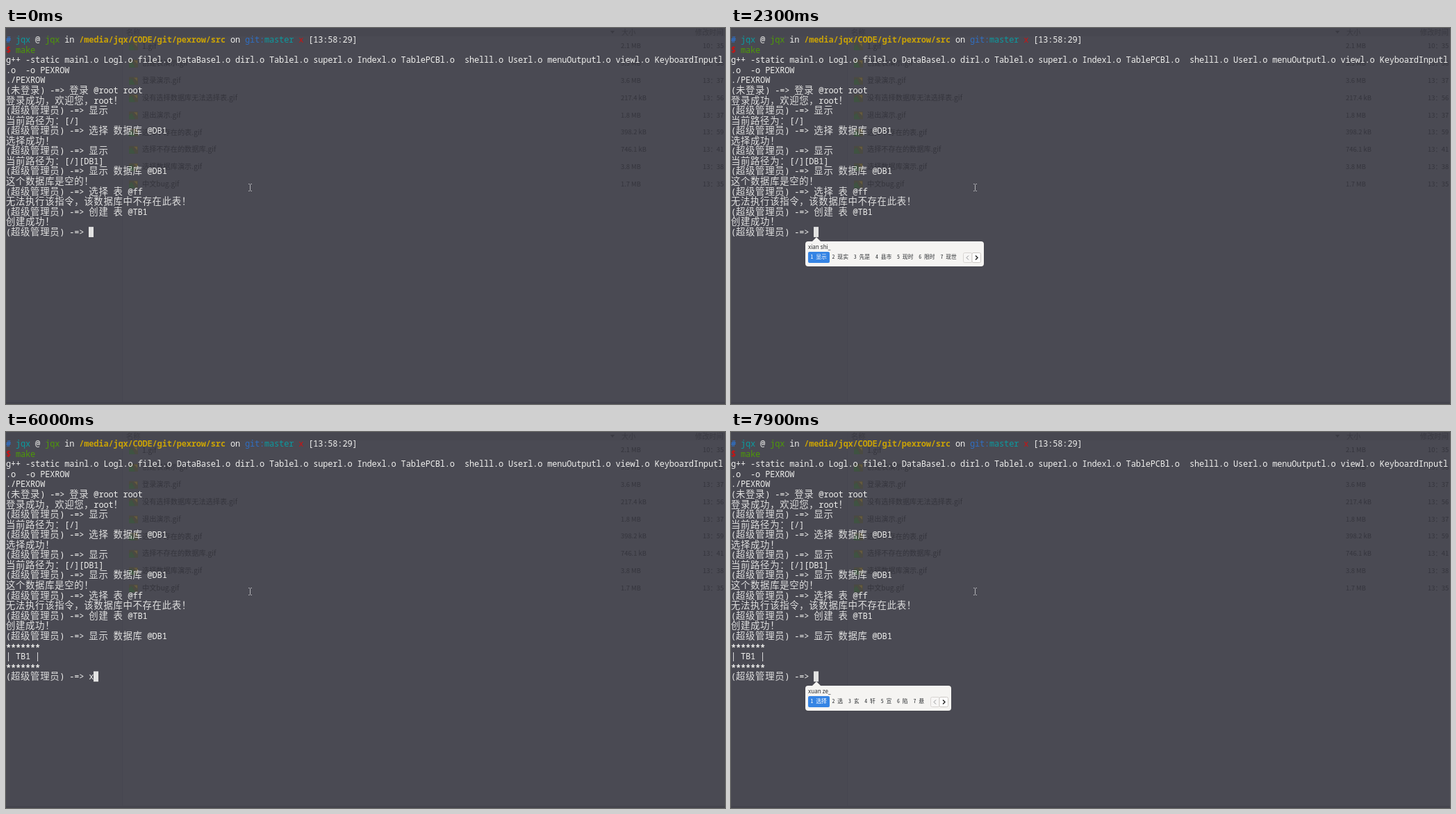
These frames come from a looping animation (1035 px wide and 541 px high, 8 s). An HTML page:

```html
<!DOCTYPE html>
<html lang="zh-CN">
<head>
<meta charset="utf-8">
<title>Terminal</title>
<style>
  html, body { margin: 0; width: 1035px; height: 541px; overflow: hidden; background: #4a4a53; }
  #stage { position: absolute; left: 0; top: 0; display: block; }
  text { white-space: pre; }
  #term { font: 12px "Noto Sans Mono", "DejaVu Sans Mono", monospace; fill: #f0f0ee; }
  #term .wide { font: 300 13.4px "Noto Sans CJK SC", "Noto Sans CJK", sans-serif; fill-opacity: .9; }
  #files { font: 10.2px "Noto Sans CJK SC", "Noto Sans CJK", sans-serif; fill: #35353d; }
  #files .num { font-size: 9.4px; }
  #files .head { fill: #3a3a42; }
  #popup {
    position: absolute; left: 107px; height: 36px; box-sizing: border-box; padding: 0 4px 0 3.5px;
    background: #f5f4f2; border-radius: 4px; box-shadow: 0 0 1px #2228;
    font-family: "Noto Sans Mono CJK SC", "Noto Sans CJK SC", "Noto Sans CJK", monospace;
    font-size: 7.8px; color: #2a2d30; white-space: pre;
  }
  #popup::before {
    content: ""; position: absolute; left: 10px; top: -6px;
    border: 6px solid transparent; border-top: 0; border-bottom-color: #f5f4f2;
  }
  #pinyin { position: absolute; left: 4px; top: 2px; font: 8px/12px "Noto Sans", sans-serif; }
  #row { display: flex; margin-top: 15px; height: 16px; line-height: 13px; }
  #row span { padding: 0 3.9px; border-radius: 2px; }
  #row span:first-child { background: #3584e4; color: #fff; }
  #row svg { flex: none; margin-left: 5px; fill: none; }
</style>
</head>
<body>
<svg id="stage" width="1035" height="541">
  <rect width="167" height="541" fill="#494952"/>
  <rect width="1035" height="12" fill="#474750"/>
  <rect x="167" width="1" height="541" fill="#464650"/>
  <rect y="538" width="1035" height="3" fill="#44444d"/>
  <g id="files"></g>
  <g id="term"></g>
  <path d="M349 224.5h1.5l1 1 1-1h1.5M351.5 225.5v8M349 234.5h1.5l1-1 1 1h1.5" fill="none" stroke="#b4b4b8"/>
</svg>
<div id="popup"><div id="pinyin"></div><div id="row"></div></div>
<script>
const CELL = 7.02, LINE = 14.56, TOP = 9.5, LOOP = 8000;
const $ = id => document.getElementById(id);
const rowTop = row => TOP + row * LINE;
const span = ch => ch > '\u2e80' ? 2 : 1;
const columns = s => [...s].reduce((n, ch) => n + span(ch), 0);

function add(parent, tag, attrs, content = '') {
  const el = document.createElementNS('http://www.w3.org/2000/svg', tag);
  for (const key in attrs) el.setAttribute(key, attrs[key]);
  el.textContent = content;
  return parent.appendChild(el);
}

// Puts every character on the terminal grid, in runs of narrow and wide ones.
function print(parent, row, s, col = 0, style = {}) {
  for (const run of s.match(/[\u2e80-\uffff]+|[^\u2e80-\uffff]+/g)) {
    const width = span(run[0]);
    const x = [...run].map((_, i) => ((col + i * width) * CELL).toFixed(2)).join(' ');
    add(parent, 'text', { x, y: rowTop(row) + 11.7, class: width > 1 ? 'wide' : '', ...style },
      run.replace(/ /g, '\u00a0'));
    col += columns(run);
  }
  return col;
}

// File manager showing through the terminal
const files = $('files');
const faint = (x, y, s, cls = '') => add(files, 'text', { x, y, class: cls }, s);
faint(173, 9.5, '名称', 'head');
faint(886, 9.5, '大小', 'head');
faint(992, 9.5, '修改时间', 'head');
add(files, 'path', { d: 'M870 4h6l-3 4z', class: 'head' });
[
  ['1', '2.1 MB', '10：35'],
  ['创建表演示', '5.3 MB', '13：58'],
  ['登录演示', '3.6 MB', '13：37'],
  ['没有选择数据库无法选择表', '217.4 kB', '13：56'],
  ['退出演示', '1.8 MB', '13：37'],
  ['选择不存在的表', '398.2 kB', '13：59'],
  ['选择不存在的数据库', '746.1 kB', '13：41'],
  ['选择数据库演示', '3.8 MB', '13：38'],
  ['中文bug', '1.7 MB', '13：35']
].forEach(([name, size, time], i) => {
  const y = 26 + i * 24.8;
  add(files, 'rect', { x: 177, y: y - 5, width: 13, height: 11, fill: '#4b4a42' });
  add(files, 'path', { d: `M177 ${y + 6}v-6l4-3 5 9z`, fill: '#3f5342' });
  add(files, 'path', { d: `M184 ${y - 4}h5v5z`, fill: '#665a3e' });
  faint(196, y + 3.6, name + '.gif');
  faint(885, y + 3.4, size, 'num');
  faint(1003, y + 3.4, time, 'num');
});

// Terminal history
const term = $('term');
const blue = '#2f6fc4', cyan = '#0a9ba0', green = '#4e9a06', red = '#d01010';
const styled = (row, parts) => parts.reduce((col, [s, fill = '#f0f0ee', weight = 400]) =>
  print(term, row, s, col, { fill, 'font-weight': weight }), 0);
styled(0, [
  ['# ', blue, 700], ['jqx ', cyan], ['@ '], ['jqx ', green], ['in '],
  ['/media/jqx/CODE/git/pexrow/src ', '#c9a206', 700], ['on '],
  ['git:', blue], ['master ', cyan], ['x ', red], ['[13:58:29]']
]);
styled(1, [['$ ', red, 700], ['make', green]]);

const prompt = '(超级管理员) -=> ', home = columns(prompt);
[
  'g++ -static mainl.o Logl.o filel.o DataBasel.o dirl.o Tablel.o superl.o Indexl.o ' +
    'TablePCBl.o  shelll.o Userl.o menuOutputl.o viewl.o KeyboardInputl',
  '.o  -o PEXROW',
  './PEXROW',
  '(未登录) -=> 登录 @root root',
  '登录成功，欢迎您，root！',
  prompt + '显示',
  '当前路径为：[/]',
  prompt + '选择 数据库 @DB1',
  '选择成功！',
  prompt + '显示',
  '当前路径为：[/][DB1]',
  prompt + '显示 数据库 @DB1',
  '这个数据库是空的！',
  prompt + '选择 表 @ff',
  '无法执行该指令，该数据库中不存在此表！',
  prompt + '创建 表 @TB1',
  '创建成功！',
  prompt
].forEach((s, i) => print(term, i + 2, s));

// Printed once the command has run; the stars sit mid-cell
const output = add(term, 'g', {});
const stars = row => print(output, row, '*******', 0, { transform: 'translate(0 2.5)', 'font-weight': 600 });
print(output, 19, '显示 数据库 @DB1', home);
stars(20);
print(output, 21, '| TB1 |');
stars(22);
print(output, 23, prompt);

const input = add(term, 'g', {});
const caret = add(term, 'rect', { width: 7, height: 14.8, fill: '#e2e2e2' });

// [time, typed text, pinyin, candidates]
const RUN = 4700;
const steps = [[0, '']];
const type = (start, s) => [...s].forEach((_, i) => steps.push([start + i * 100, s.slice(0, i + 1)]));
const erase = (start, s) => [...s].forEach((_, i) => steps.push([start + i * 100, s.slice(0, -1 - i)]));
const compose = (time, pinyin, words) => steps.push([time, '', pinyin, words]);

type(200, 'xians');
steps.push([800, 'xian']);
erase(1000, 'xian');
compose(1800, 'x', '下 想 小 向 学 新 些');
compose(1900, 'xi', '系 西 喜 洗 细 吸 希');
compose(2000, 'xia', '下 夏 吓 瞎 虾 峡 侠');
compose(2100, 'xian', '先 现 线 县 显 限 闲');
compose(2200, 'xian s', '显示 先生 现实 县市 现时 限时 先是');
compose(2300, 'xian shi', '显示 现实 先是 县市 现时 限时 现世');
steps.push(
  [2400, '显示'], [3300, '显示 数据库'], [3400, '显示 数据库 '], [4000, '显示 数据库 @'],
  [4300, '显示 数据库 @DB'], [4400, '显示 数据库 @DB1'], [RUN, '']
);
type(6000, 'xuan');
erase(6600, 'xua' + 'n');
steps[steps.length - 1][0] = 7000;
compose(7300, 'x', '下 想 小 向 学 新 些');
compose(7400, 'xu', '需 许 续 须 虚 徐 序');
compose(7500, 'xua', '选 宣 旋 悬 玄 轩 喧');
compose(7600, 'xuan', '选 宣 旋 悬 玄 轩 喧');
compose(7700, 'xuan z', '选择 选中 旋转 选自 选在 宣战 选址');
compose(7900, 'xuan ze', '选择 选 玄 轩 宣 陷 悬');

const pager = `<svg width="26" height="16">
  <rect x=".5" y="1.5" width="12.5" height="14" rx="2" fill="#f7f6f5" stroke="#d8d5d2"/>
  <rect x="13" y="1.5" width="12.5" height="14" rx="2" fill="#fff" stroke="#cdc9c5"/>
  <path d="M8 5.5l-3 3 3 3" stroke="#8b8e90"/>
  <path d="M18 5.5l3 3-3 3" stroke="#222" stroke-width="1.4"/></svg>`;

function show([time, typed, pinyin, words]) {
  const row = time < RUN ? 19 : 23;
  output.setAttribute('visibility', time < RUN ? 'hidden' : 'visible');
  input.textContent = '';
  if (typed) print(input, row, typed, home);
  caret.setAttribute('x', Math.floor((home + columns(typed)) * CELL));
  caret.setAttribute('y', rowTop(row));
  const popup = $('popup');
  popup.style.display = pinyin ? 'block' : 'none';
  if (!pinyin) return;
  popup.style.top = Math.round(rowTop(row) + 20.8) + 'px';
  $('pinyin').textContent = pinyin + '_';
  $('row').innerHTML = words.split(' ').map((w, i) => `<span>${i + 1} ${w}</span>`).join('') + pager;
}

let current;
function tick() {
  const now = performance.now() % LOOP;
  const step = steps.filter(s => s[0] <= now).pop();
  if (step !== current) show(current = step);
  requestAnimationFrame(tick);
}
tick();
</script>
</body>
</html>
```
